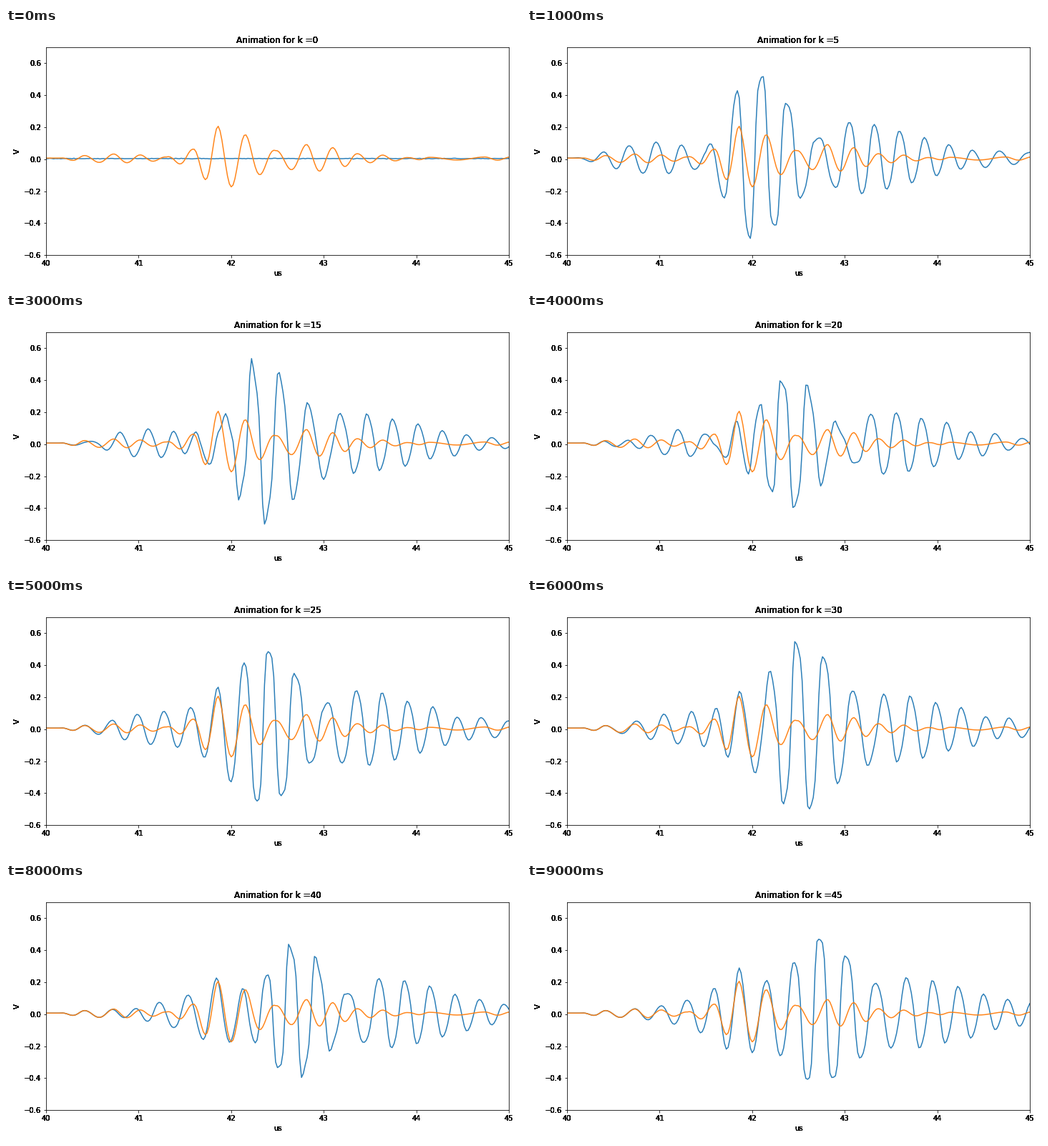
Animation of 720x360 px, one loop 10 s. Source, as a matplotlib script:

```python
import numpy as np
import matplotlib.pyplot as plt
from matplotlib.animation import FuncAnimation

W, H, DPI = 720, 360, 72
K_STEP = 5
DRIFT = 0.016  # echo delay in us per unit of k
K_REF = 10     # k at which the echo crests below are given
REST = 0.004
LAYERS = 8

plt.rcParams.update({"font.family": "DejaVu Sans", "font.size": 10})

# Crests as (time in us after 40, level in V).
DIRECT = [
    (0.15, 0.003), (0.41, 0.019), (0.73, 0.029), (1.02, 0.023),
    (1.30, 0.010), (1.575, 0.056), (1.855, 0.204), (2.155, 0.150),
    (2.48, 0.050), (2.813, 0.089), (3.10, 0.069), (3.37, 0.030),
    (3.64, 0.022), (3.92, 0.006), (4.14, 0.008), (4.74, 0.010),
    (5.02, 0.010)]
ECHO = [
    (0.15, 0), (0.45, 0.025), (0.73, 0.074), (1.03, 0.100), (1.31, 0.085),
    (1.58, 0.050), (1.88, 0.270), (2.145, 0.500), (2.435, 0.410),
    (2.76, 0.170), (3.11, 0.210), (3.39, 0.205), (3.665, 0.165),
    (3.94, 0.130), (4.205, 0.080), (4.46, 0.060), (4.75, 0.040),
    (5.04, 0.030)]

t = np.linspace(0, 5, 251)


def wave(crests, time, skew=0):
    """Oscillation through the crests; skew steepens the strong fronts."""
    x, level = np.array(crests).T
    phase = 2 * np.pi * np.interp(time, x, np.arange(len(x)))
    env = np.interp(time, x, level)
    return env * np.cos(phase - skew * env * np.sin(phase) ** 2)


direct = REST + wave(DIRECT, t)
flat = REST + np.random.default_rng(4).normal(0, 0.001, len(t))


def received(k):
    if k == 0:
        return flat
    return direct + wave(ECHO, t - DRIFT * (k - K_REF), skew=1.4)


fig = plt.figure(figsize=(W / DPI, H / DPI), dpi=DPI, facecolor="white")
rect = (56.1 / W, 41.8 / H, 646.8 / W, 291.2 / H)


def add_layer(i):
    ax = fig.add_axes(rect, facecolor="none", label=f"layer{i}")
    ax.set(xlim=(40, 45), ylim=(-0.6, 0.7), xlabel="us", ylabel="V",
           xticks=range(40, 46), yticks=np.arange(-3, 4) * 0.2)
    ax.yaxis.set_major_formatter("{x:.1f}")
    if i > 0:
        ax.spines[:].set_visible(False)
        ax.tick_params(color="none")
    return ax


# Stacked copies of the labels give the heavy text.
layers = [add_layer(i) for i in range(LAYERS)]
blue, = layers[0].plot(40 + t, flat, color="#1f77b4", lw=1.5, alpha=0.95)
layers[0].plot(40 + t, direct, color="#ff7f0e", lw=1.5, alpha=0.95)


def update(i):
    k = i * K_STEP
    blue.set_ydata(received(k))
    titles = [ax.set_title(f"Animation for k ={k}", fontsize=12) for ax in layers]
    return [blue, *titles]


anim = FuncAnimation(fig, update, frames=10, interval=1000,
                     repeat=True, repeat_delay=0, blit=False)
plt.show()
```
